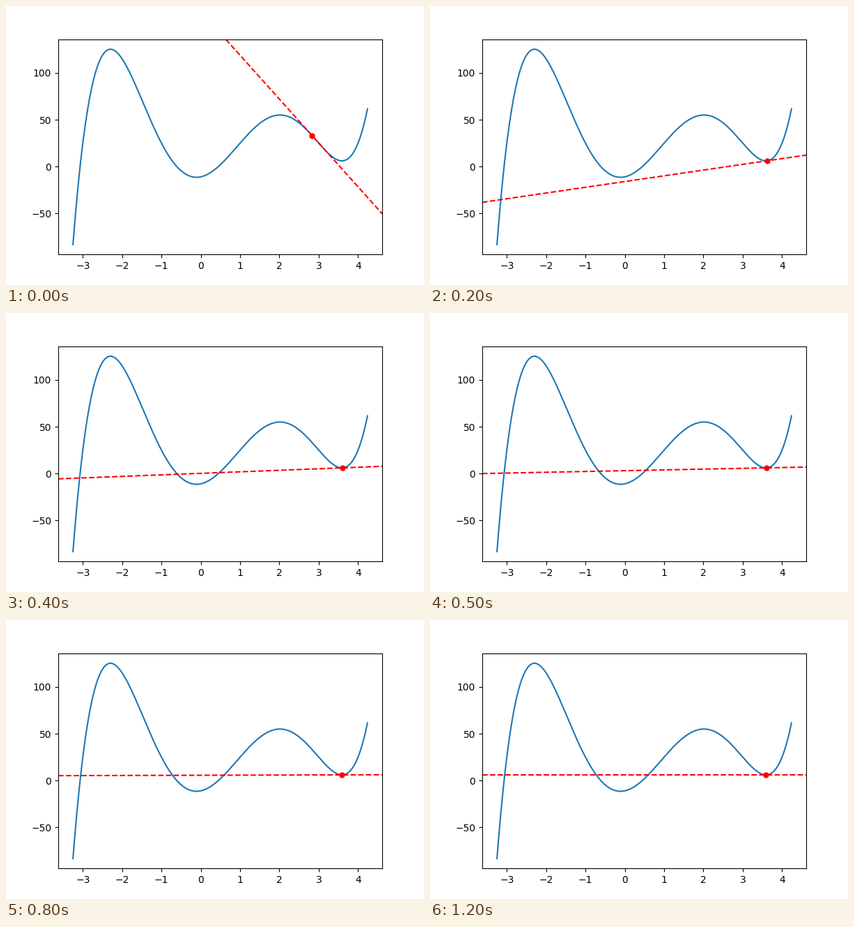
These frames come from a looping animation (600 px wide and 400 px high, 1.25 s). A matplotlib script:

```python
import matplotlib.pyplot as plt
import numpy as np
from matplotlib.animation import FuncAnimation

STEPS = 25
RATE = 0.01
START = 2.5

curve = np.poly1d([1, -4, -10, 40, 9, -11])
slope = curve.deriv()


def descend(x, steps):
    """Positions visited by gradient descent, after each step."""
    path = []
    for _ in range(steps):
        x -= RATE * slope(x)
        path.append(x)
    return path


path = descend(START, STEPS)

fig, ax = plt.subplots(figsize=(6, 4), dpi=100)
xs = np.arange(-3.25, 4.25, 0.01)
ax.plot(xs, curve(xs))
x_lim, y_lim = ax.get_xlim(), ax.get_ylim()
ax.set(xlim=x_lim, ylim=y_lim)

dot, = ax.plot([], [], "ro", markersize=5)
tangent, = ax.plot([], [], "r--")


def clipped_tangent(x):
    """End points of the tangent at x, cut to the axes box."""
    y, m = curve(x), slope(x)
    ends = list(x_lim)
    if abs(m) > 1e-9:
        crossings = sorted(x + (edge - y) / m for edge in y_lim)
        ends = [max(ends[0], crossings[0]), min(ends[1], crossings[1])]
    return ends, [y + m * (end - x) for end in ends]


def update(i):
    x = path[i]
    dot.set_data([x], [curve(x)])
    tangent.set_data(*clipped_tangent(x))
    return dot, tangent


anim = FuncAnimation(fig, update, frames=STEPS, interval=50,
                     repeat=True, repeat_delay=0)
plt.show()
```
